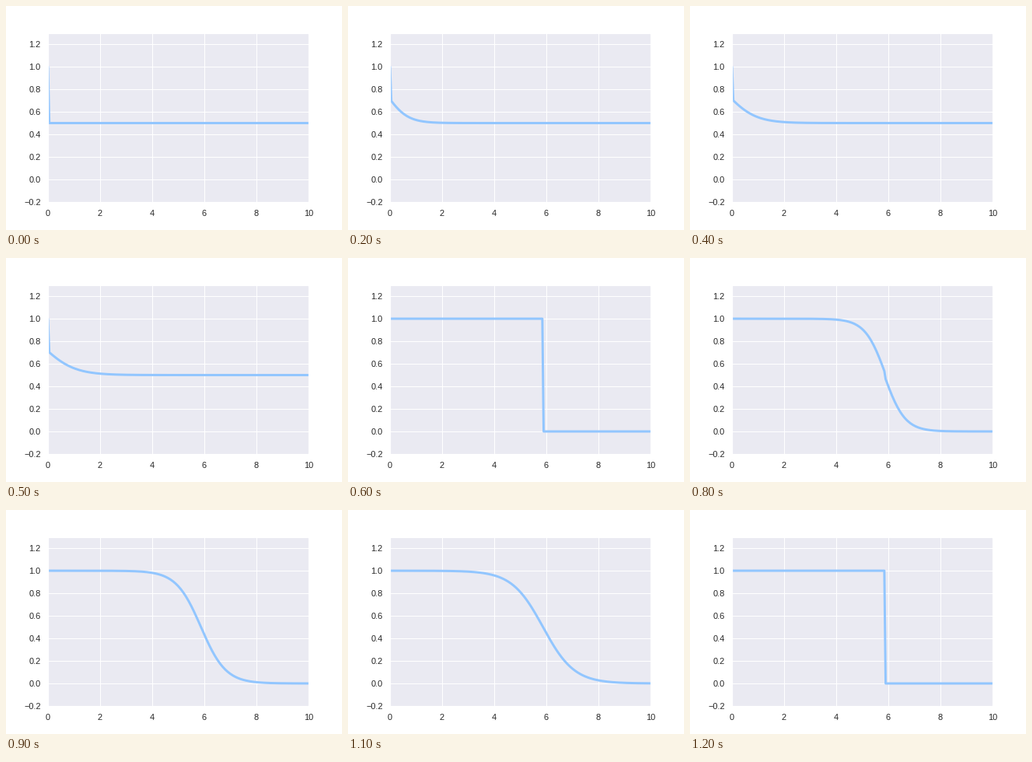
Recreate the animation shown at these times as a matplotlib script. Size 432 px wide and 288 px high, loop 1.3 s.

```python
import numpy as np
import matplotlib.pyplot as plt
from matplotlib.animation import FuncAnimation

plt.rcParams.update({
    "font.family": "Liberation Sans",
    "font.size": 12,
    "text.color": ".15",
    "axes.facecolor": "#EAEAF2",
    "axes.edgecolor": "white",
    "axes.linewidth": 1.25,
    "axes.grid": True,
    "axes.axisbelow": True,
    "grid.color": "white",
    "grid.linewidth": 1,
    "lines.solid_capstyle": "round",
})
for axis in "xtick", "ytick":
    plt.rcParams.update({
        f"{axis}.color": ".15",
        f"{axis}.labelsize": 11,
        f"{axis}.major.size": 6,
        f"{axis}.major.pad": 3.5,
    })

FRAMES, INTERVAL = 13, 100
CYCLE = 6        # steps between two sharp fronts
CENTER = 5.875

x = np.linspace(0, 10, 201)


def falloff(d, step, gap):
    """Logistic drop that widens with each step; gap leaves a jump at d = 0."""
    if step == 0:
        return np.where(d > 0, 0.0, 1.0)
    slope = 3.45 * step ** -0.45
    return 1 / (1 + np.exp(slope * d + gap * np.sign(d)))


def profile(frame):
    cycle, step = divmod(frame, CYCLE)
    if cycle == 0:
        y = 0.5 + 0.5 * falloff(x, step, 0.31)
        y[0] = 1
        return y
    gap = {1: 0.28, 2: 0.08}.get(step, 0)
    return falloff(x - CENTER, step, gap)


fig = plt.figure(figsize=(6, 4), dpi=72, facecolor="white")
fig.subplots_adjust(left=0.125, right=0.9, bottom=0.125, top=0.88)
ax = fig.add_subplot()
ax.set(xlim=(0, 10), ylim=(-0.2, 1.3),
       xticks=np.arange(0, 11, 2), yticks=np.arange(-0.2, 1.3, 0.2))
ax.tick_params(bottom=False, left=False)
line, = ax.plot(x, profile(0), color="#92C6FF", lw=3)


def update(frame):
    line.set_ydata(profile(frame))
    return line,


anim = FuncAnimation(fig, update, frames=FRAMES, interval=INTERVAL,
                     repeat=True, repeat_delay=0)
plt.show()
```
